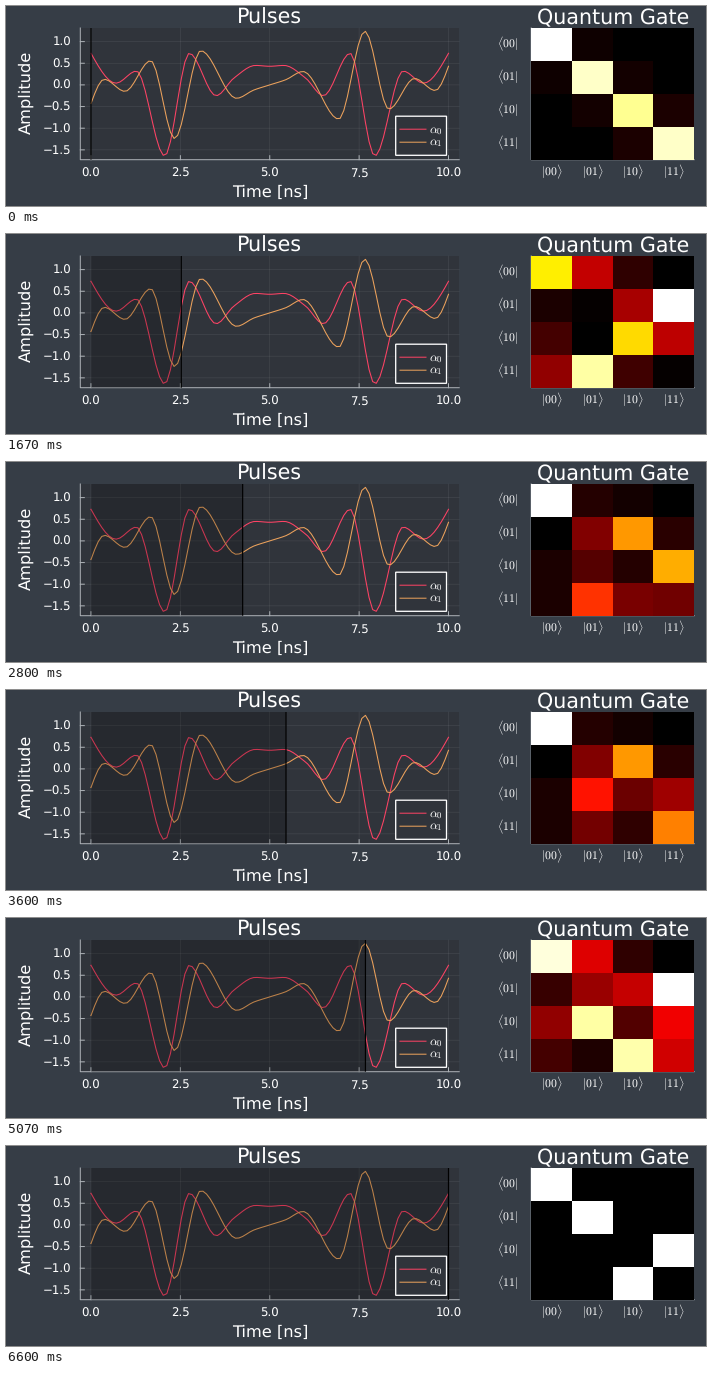
A matplotlib script that plays this animation: 700 px wide and 200 px high, repeating every 8670 ms.

```python
import numpy as np
import matplotlib.pyplot as plt
from matplotlib.animation import FuncAnimation
from matplotlib.colors import LinearSegmentedColormap
from matplotlib.patches import Rectangle

plt.rcParams.update({"font.family": "DejaVu Sans", "mathtext.fontset": "cm",
                     "text.hinting": "none"})

PX = 0.72  # points per pixel at 100 dpi
STEPS, LOOP, INTERVAL = 100, 8670, 30
BG, PANEL, AXIS, INK = "#363d46", "#30343b", "#adb2b7", "white"
COLORS = ("#fe4365", "#eca25c")

# Turning points of each pulse up to the middle: time, amplitude
EVEN_PULSE = [(0, .73), (.7, .04), (1.27, .32), (2.06, -1.64), (2.75, .73),
              (3.5, -.25), (4, .16), (4.6, .45), (5, .43)]
ODD_PULSE = [(0, -.43), (.37, .13), (.95, -.15), (1.67, .56), (2.34, -1.24),
             (3.07, .79), (4.07, -.31), (4.55, -.12), (5, 0)]


def pulse(half, parity, t):
    """Monotone cubic through the points and their reflection about the middle."""
    keys = half + [(10 - x, parity * v) for x, v in half[-2::-1]]
    x, v = np.array(keys, float).T
    d = np.diff(v) / np.diff(x)
    same = np.maximum(d[:-1] * d[1:], 0)
    inner = 2 * same / np.where(same > 0, d[:-1] + d[1:], 1)
    m = np.concatenate(([1.5 * d[0]], inner, [1.5 * d[-1]]))
    i = np.clip(np.searchsorted(x, t, side="right") - 1, 0, len(d) - 1)
    h = x[i + 1] - x[i]
    s = (t - x[i]) / h
    return ((1 + 2 * s) * (1 - s) ** 2 * v[i] + s * (1 - s) ** 2 * h * m[i]
            + s * s * (3 - 2 * s) * v[i + 1] + s * s * (s - 1) * h * m[i + 1])


def band(stay, hop):
    """Populations that only leak to neighbouring levels."""
    return np.diag(stay) + np.diag(hop, 1) + np.diag(hop, -1)


def mirror(gate):
    """Time reversal around the middle swaps the last two rows."""
    return gate[[0, 1, 3, 2]]


def gate_steps(drive):
    """Blend a few gates at a pace set by the drive strength."""
    kick = band([1, .945, .89, .945], [.02, .03, .04])
    leak = band([.73, .63, .67, 1], [.12, .13, .09])
    cross = np.array([[.72, .28, .07, 0], [.04, .01, .24, 1],
                      [.1, 0, .69, .27], [.21, .91, .09, .01]])
    middle = np.array([[1, .07, .05, .02], [.02, .2, .6, .08],
                       [.06, .14, .07, .63], [.06, .45, .19, .18]])
    half = {0: kick, 12: leak, 25: cross, 32: middle, 42: middle}
    keys = dict(half)
    for k in sorted(half, reverse=True):
        keys[STEPS - 2 - k] = mirror(half[k])
    keys[STEPS - 1] = mirror(np.eye(4))

    area = np.cumsum(drive + .05)
    cells = np.array(list(keys.values())).reshape(len(keys), 16)
    steps = np.array([np.interp(area, area[list(keys)], c) for c in cells.T]).T
    low, high = steps.min(1, keepdims=True), steps.max(1, keepdims=True)
    return ((steps - low) / (high - low)).reshape(STEPS, 4, 4)


def px_x(t):
    return 85 + 35.75 * t


def px_y(v):
    return 78.9 - 43.3 * v


time = np.linspace(0, 10, STEPS)
pulses = [pulse(EVEN_PULSE, 1, time), pulse(ODD_PULSE, -1, time)]
gates = gate_steps(np.hypot(*pulses))

fig = plt.figure(figsize=(7, 2), dpi=100, facecolor=BG)
ax = fig.add_axes([0, 0, 1, 1])
ax.axis("off")


def line(x, y, color=AXIS, width=1.0, **kw):
    return ax.plot(x, y, color=color, lw=width * PX, snap=False, **kw)[0]


def box(x, y, w, h, color, **kw):
    return ax.add_patch(Rectangle((x, y), w, h, fc=color, **kw))


def label(x, y, text, size, ha="center", va="baseline", **kw):
    ax.text(x, y, text, fontsize=size * PX, color=INK, ha=ha, va=va, **kw)


# Pulse panel
LEFT, RIGHT, TOP, BOTTOM = 74.3, 453.2, 22, 153.7
box(LEFT, TOP, RIGHT - LEFT, BOTTOM - TOP, PANEL, lw=0)
for t in np.arange(0, 10.1, 2.5):
    x = px_x(t)
    line([x, x], [TOP, BOTTOM], INK, .6, alpha=.1)
    line([x, x], [BOTTOM - 4, BOTTOM])
    label(x, 170.6, f"{t:.1f}", 11.8)
for v in np.arange(-1.5, 1.1, .5):
    y = px_y(v)
    line([LEFT, RIGHT], [y, y], INK, .6, alpha=.1)
    line([LEFT, LEFT + 4], [y, y])
    label(65, y + 4.3, f"{v:.1f}".replace("-", "\u2212"), 11.8, "right")
line([LEFT, LEFT, RIGHT], [TOP, BOTTOM, BOTTOM])
for curve, color in zip(pulses, COLORS):
    line(px_x(time), px_y(curve), color, 1.05, zorder=3)
shade = box(px_x(0), TOP, 0, BOTTOM - TOP, "black", alpha=.2, lw=0, zorder=4)
cursor = line([85, 85], [TOP, BOTTOM], "black", 1.2, zorder=5, solid_capstyle="butt")

label(263.5, 18, "Pulses", 20.7)
label(264, 191.3, "Time [ns]", 16.3)
label(27.5, 86.5, "Amplitude", 16.3, "right", "center", rotation=90)

# Legend
box(389.7, 110.2, 50.8, 39.1, PANEL, ec=INK, lw=1.3 * PX, snap=False, zorder=6)
for i, color in enumerate(COLORS):
    y = 123.2 + 13 * i
    line([394, 420], [y, y], color, 1, zorder=7)
    label(423, y + 3, rf"$\alpha_{i}$", 12.5, "left", zorder=7)

# Gate panel
hot = LinearSegmentedColormap.from_list(
    "hot_black", [(0, "black"), (.365, "red"), (.746, "yellow"), (1, "white")])
X0, X1 = 525.2, 688.2
heat = ax.pcolormesh(np.linspace(X0, X1, 5), np.linspace(TOP, BOTTOM, 5), gates[0],
                     cmap=hot, vmin=0, vmax=1, antialiased=False, zorder=2)
line([X0, X0, X1], [TOP, BOTTOM, BOTTOM], zorder=1)
label(607, 18, "Quantum Gate", 20.7)
for i in range(4):
    bits = f"{i:02b}"
    label(512, TOP + 32.9 * (i + .5) + 4, rf"$\langle {bits}|$", 11.8, "right")
    label(X0 + 40.7 * (i + .5), 170.3, rf"$|{bits}\rangle$", 11.8)

ax.set_xlim(0, 700)
ax.set_ylim(200, 0)


def draw(n):
    # 15 steps a second, then the last one holds
    k = min(STEPS - 1, (n * INTERVAL + 20) * 3 // 200)
    x = px_x(time[k])
    shade.set_width(x - px_x(0))
    cursor.set_xdata([x, x])
    heat.set_array(gates[k])
    return shade, cursor, heat


anim = FuncAnimation(fig, draw, frames=LOOP // INTERVAL, interval=INTERVAL,
                     repeat=True, repeat_delay=0, blit=False)
plt.show()
```
